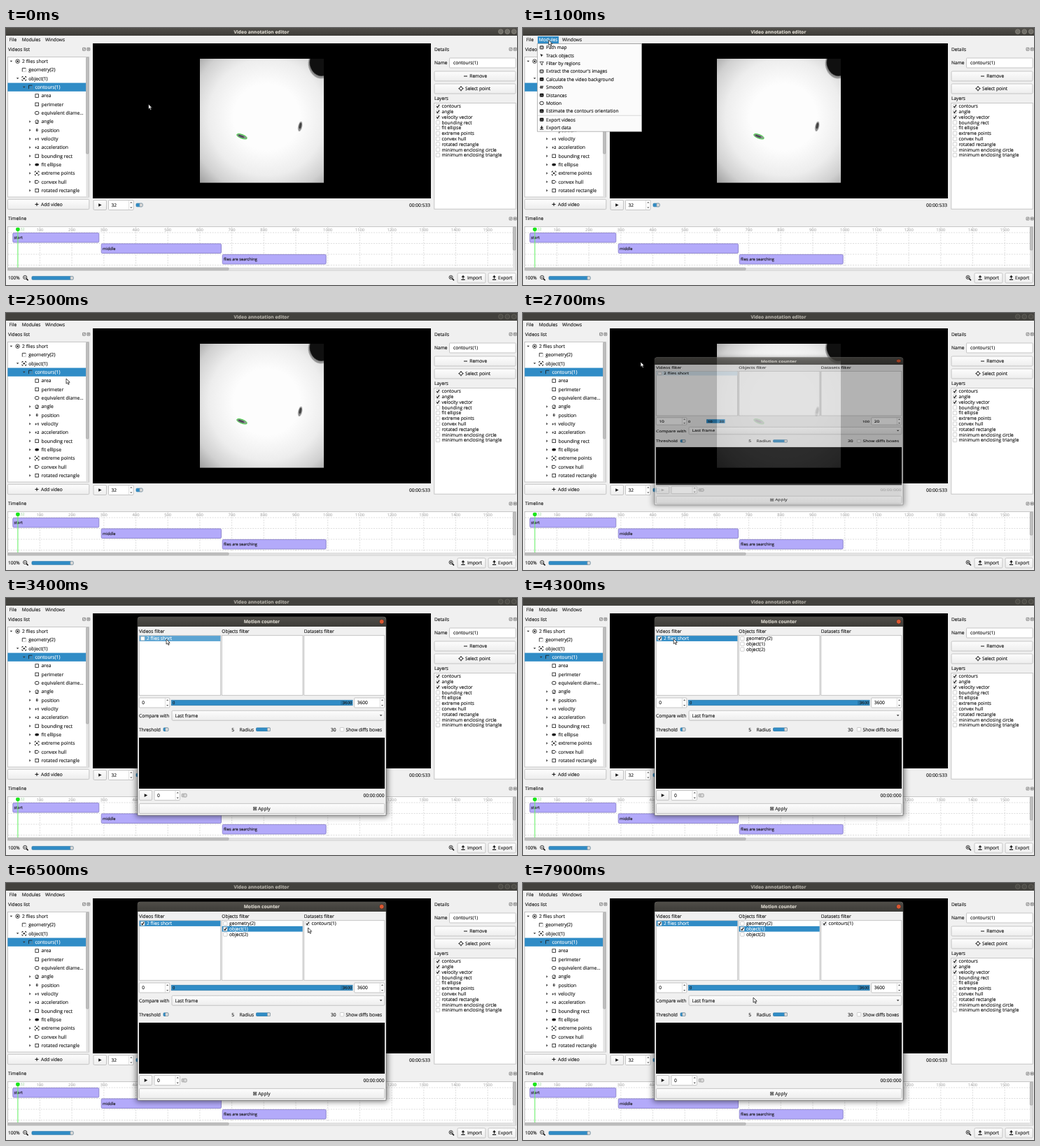
Write an HTML page that moves like this. It is 730 px wide and 368 px high and loops after 8000 ms.

```html
<!DOCTYPE html>
<html lang="en">
<head>
<meta charset="utf-8">
<title>Video annotation editor</title>
<style>
  html, body { margin: 0; width: 100%; height: 100%; overflow: hidden; background: #f0f0f0; }
  svg { display: block; width: 730px; height: 368px; }
  text { font: 6.62px "Open Sans", "Noto Sans", sans-serif; text-rendering: geometricPrecision; white-space: pre; stroke-width: .13; }
</style>
</head>
<body>
<svg viewBox="0 0 730 368">
  <defs>
    <linearGradient id="bar" x2="0" y2="1"><stop stop-color="#504e49"/><stop offset="1" stop-color="#3d3c38"/></linearGradient>
    <linearGradient id="face" x2="0" y2="1"><stop stop-color="#fdfdfd"/><stop offset="1" stop-color="#ededed"/></linearGradient>
    <radialGradient id="dish" cx=".54" cy=".47" r=".76">
      <stop offset=".35" stop-color="#fdfdfd"/><stop offset=".62" stop-color="#ededed"/>
      <stop offset=".82" stop-color="#d0d0d0"/><stop offset="1" stop-color="#9c9c9c"/>
    </radialGradient>
    <filter id="soft" x="-50%" y="-50%" width="200%" height="200%"><feGaussianBlur stdDeviation=".7"/></filter>
    <filter id="shade" x="-10%" y="-10%" width="120%" height="120%"><feGaussianBlur stdDeviation="4"/></filter>
    <clipPath id="frame"><rect x="277" y="44" width="177" height="177.6"/></clipPath>
  </defs>
  <g id="window"></g>
  <g id="overlay"></g>
</svg>
<script>
const LOOP = 8000, STEP = 100;
const BLUE = '#308cc6', INK = '#151515', EDGE = '#b9b9b9';

const rect = (x, y, w, h, fill, stroke = 'none', r = 0) =>
  `<rect x="${x}" y="${y}" width="${w}" height="${h}" rx="${r}" fill="${fill}" stroke="${stroke}" stroke-width=".8"/>`;
const path = (d, stroke = INK, width = .9, fill = 'none') =>
  `<path d="${d}" fill="${fill}" stroke="${stroke}" stroke-width="${width}"/>`;
const disc = (x, y, r, fill, stroke = 'none') =>
  `<circle cx="${x}" cy="${y}" r="${r}" fill="${fill}" stroke="${stroke}" stroke-width=".8"/>`;
// Text is placed by its vertical middle.
const text = (x, y, s, { fill = INK, anchor = 'start', size = 6.62, bold = false } = {}) =>
  `<text x="${x}" y="${y + size * .36}" fill="${fill}" stroke="${fill}" text-anchor="${anchor}" style="font-size:${size}px;font-weight:${bold ? 700 : 400}">${s}</text>`;
const at = (x, y, body) => `<g transform="translate(${x} ${y})">${body}</g>`;

const button = (x, y, w, h) => rect(x, y, w, h, 'url(#face)', EDGE, 1.5);
const field = (x, y, w, h) => rect(x, y, w, h, '#fff', EDGE, 1);
const play = (x, y, fill = INK) => path(`M${x - 1.8} ${y - 2.3}l4.4 2.3l-4.4 2.3z`, 'none', 0, fill);

function spin(x, y, w, value) {
  const a = x + w - 3.2, mid = y + 7;
  return field(x, y, w, 14) + path(`M${x + w - 6.4} ${y}v14`, '#d0d0d0', .7) + text(x + 4, mid, value) +
    path(`M${a - 1.5} ${mid - 3}l1.5 -1.8l1.5 1.8z`, 'none', 0, '#555') +
    path(`M${a - 1.5} ${mid + 3}l1.5 1.8l1.5 -1.8z`, 'none', 0, '#555');
}
const slider = (x, y, w, blue = true) =>
  rect(x, y - 2.3, w, 4.6, blue ? BLUE : '#c8c8c8', blue ? '#2a7bad' : '#aaa', 1) +
  rect(x + w - 4, y - 2.3, 4, 4.6, '#dedede', '#a2a2a2', 1);
const check = (x, y, on) => rect(x - 2.7, y - 2.7, 5.4, 5.4, '#fff', '#c4c4c4', .6) +
  (on ? path(`M${x - 1.7} ${y}l1.2 1.7l2.3 -3.6`, '#111', 1.1) : '');
const dockButtons = (x, y) => [x, x + 6.3].map(cx =>
  rect(cx - 2, y - 2, 4, 4, '#e4e4e4', '#777', .5) + path(`M${cx - 1} ${y + 1}l2 -2`, '#555', .7)).join('') +
  path(`M${x + 5.3} ${y - 1}l2 2`, '#555', .7);
const dock = (x, y, label, bx) => text(x, y, label) + dockButtons(bx, y);

const SQUARE = rect(-2.3, -2.3, 4.6, 4.6, 'none', INK);
const CORNERS = path('M-2.8 -1.2v-1.6h1.6M1.2 -2.8h1.6v1.6M2.8 1.2v1.6h-1.6M-1.2 2.8h-1.6v-1.6');
const DOTTED = path('M-2.5 2.5v-5h5', INK, .8) + path('M2.5 -2v4.5h-5', '#888', .8).replace('/>', ' stroke-dasharray="1 .8"/>');
const word = s => text(0, 0, s, { anchor: 'middle', size: 5.2, bold: true });
const ICONS = {
  video: disc(0, 0, 2.8, 'none', INK) + disc(0, 0, 1.2, INK),
  outline: DOTTED,
  object: CORNERS + disc(0, 0, 1.2, INK),
  square: SQUARE,
  ring: `<ellipse rx="2.8" ry="2.3" fill="none" stroke="${INK}" stroke-width=".9"/>`,
  dial: disc(0, 0, 2.3, 'none', INK) + path('M0 0l2 -1.6M-2 2.6h4', INK, 1),
  zero: word('0'), one: word('+1'), two: word('+2'),
  oval: `<ellipse rx="2.8" ry="1.9" fill="${INK}"/>`,
  hull: path('M-2.6 -2h3.6l1.8 2l-1.8 2h-3.6z'),
  map: rect(-2.4, -2.1, 4.8, 4.2, '#999', INK, .5) + path('M-1.6 1.3l1.6 -2l1.6 2', '#eee', .7),
  dark: rect(-2.4, -2.1, 4.8, 4.2, INK, INK, .5) + path('M-1.6 1.3l1.6 -1.6l1.6 1.6', '#ccc', .6),
  arrow: path('M-2 -2.4l4.4 2.2l-2 .5l-.8 2z', 'none', 0, INK),
  funnel: path('M-2.6 -2.2h5.2l-1.9 2.4v2.2l-1.4 -.8v-1.4z', INK, .7),
  wave: path('M-2.5 1l1.3 -3v4l1.8 -4v4l1.8 -4', INK, .8),
  save: path('M-2.6 2.4h5.2M0 1v-3.6M-1.8 -.8l1.8 2l1.8 -2', INK, 1.1)
};
const TREE = [
  [0, 'video', '2 flies short', 'v'], [1, 'outline', 'geometry(2)'], [1, 'object', 'object(1)', 'v'],
  [2, 'outline', 'contours(1)', 'v'], [3, 'square', 'area'], [3, 'square', 'perimeter'],
  [3, 'ring', 'equivalent diame…'], [3, 'dial', 'angle', '>'], [3, 'zero', 'position', '>'],
  [3, 'one', 'velocity', '>'], [3, 'two', 'acceleration', '>'], [3, 'square', 'bounding rect', '>'],
  [3, 'oval', 'fit ellipse', '>'], [3, 'object', 'extreme points', '>'],
  [3, 'hull', 'convex hull', '>'], [3, 'square', 'rotated rectangle', '>']
];
const LAYERS = ['contours', 'angle', 'velocity vector', 'bounding rect', 'fit ellipse', 'extreme points',
  'convex hull', 'rotated rectangle', 'minimum enclosing circle', 'minimum enclosing triangle'];
const MENU = [['map', 'Path map'], ['arrow', 'Track objects'], ['funnel', 'Filter by regions'],
  ['map', "Extract the contour's images"], ['dark', 'Calculate the video background'], ['wave', 'Smooth'],
  ['dark', 'Distances'], ['ring', 'Motion'], ['dark', 'Estimate the contours orientation'],
  ['dark', 'Export videos'], ['save', 'Export data']];

function tree() {
  const rows = TREE.map(([level, icon, label, arrow], i) => {
    const y = 47.7 + i * 12.33, x = level * 9.2, chosen = i === 3;
    const mark = arrow === 'v' ? path(`M${x + 5.6} ${y - 1}l1.8 2l1.8 -2z`, 'none', 0, '#333')
      : arrow ? path(`M${x + 5.8} ${y - 1.8}l2 1.8l-2 1.8z`, 'none', 0, '#333') : '';
    return (chosen ? rect(2.4, y - 6.1, 113, 12.2, BLUE) : '') + mark + at(x + 16.6, y, ICONS[icon]) +
      text(x + 23, y, label, { fill: chosen ? '#fff' : INK, size: 6.8 });
  }).join('');
  return rect(2.4, 41.4, 116, 200.6, '#fff', EDGE) + rows +
    rect(114.4, 41.8, 3.8, 199.8, '#e2e2e2') + rect(114.6, 42, 3.4, 138, '#c0c0c0', '#aaa', 1);
}

function video() {
  return rect(124, 22, 483, 222, '#000') + rect(277, 44, 177, 177.6, 'url(#dish)') +
    `<g clip-path="url(#frame)"><g transform="translate(447.5 54) rotate(-24)" filter="url(#soft)"><ellipse rx="15" ry="19" fill="#909090"/><ellipse cx="1.5" cy="-1.5" rx="14" ry="17.5" fill="#101010"/></g>
    <g transform="translate(337 155.3) rotate(20)"><ellipse rx="7.6" ry="2.6" fill="#8c9690" stroke="#45d045" stroke-width="1.1"/><ellipse cx="-1" rx="4.6" ry="1.3" fill="#4d4858"/></g>
    <g transform="translate(420.2 141) rotate(12)" filter="url(#soft)"><ellipse rx="2.7" ry="7.2" fill="#8e8e8e"/><ellipse cy="-1" rx="1.7" ry="4.3" fill="#3f3f3f"/></g></g>` +
    button(125, 246.5, 18.5, 14) + play(134, 253.5) + spin(146.5, 246.5, 35.5, '32') + slider(186, 253.5, 9) +
    text(606, 253.5, '00:00:533', { anchor: 'end' });
}

function details() {
  return dock(612, 30.3, 'Details', 721) + text(612, 50, 'Name') + field(633.5, 43, 94.7, 14) + text(639, 49.8, 'contours(1)') +
    button(612, 62, 116, 14) + path('M654 69h5', INK, 1) + text(662.3, 69, 'Remove') +
    button(612, 80, 116, 14) + disc(650, 86.7, 2.3, 'none', INK) + path('M650 83v2M650 88.4v2M646.3 86.7h2M651.7 86.7h2') +
    text(656, 86.7, 'Select point') + text(612, 101, 'Layers') + rect(611.8, 107.4, 116.4, 151.8, '#fff', EDGE) +
    LAYERS.map((s, i) => check(617, 112 + i * 7.77, i < 3) + text(622.5, 112 + i * 7.77, s)).join('');
}

function timeline() {
  let grid = '';
  for (let i = 0; i <= 15; i++) {
    const x = 2.7 + i * 45.7;
    grid += path(`M${x} 285v57`, '#cfcfcf', .7) + (i ? text(x, 289.3, i * 100, { fill: '#aaa', anchor: 'middle', size: 5.8 }) : '');
  }
  for (let i = 0; i < 4; i++) grid += path(`M3 ${293 + i * 15.5}h721`, '#cfcfcf', .7);
  const bars = [[9.8, 123, 'start'], [136.2, 171.3, 'middle'], [309.2, 148, 'flies are searching']].map(([x, w, s], i) =>
    rect(x, 293.4 + i * 15.5, w, 13.6, '#b3aafa', '#8279c4', 1.5) + text(x + 1.8, 300.4 + i * 15.5, s, { size: 5.7 })).join('');
  return dock(3, 273, 'Timeline', 721) + rect(2.4, 284.4, 726, 62.6, '#fff', EDGE) +
    `<g stroke-dasharray="2 1.6">${grid}</g>` + bars +
    text(20.5, 288.5, '32', { fill: '#b0ddb0', size: 5.4 }) + path('M16.9 288v55', '#6cf06c', 1.1) +
    rect(14.1, 285.7, 5.6, 5.2, '#19e619', 'none', 1.8) +
    rect(724.2, 284.8, 4, 61.8, '#e2e2e2') + rect(724.4, 285, 3.6, 33, '#c0c0c0', '#aaa', 1) +
    rect(2.8, 343, 721, 3.8, '#e2e2e2') + rect(3, 343.4, 315, 3.2, '#c0c0c0', '#aaa', 1);
}

const lens = (x, y, d) => disc(x - .8, y - .8, 2.6, 'none', INK) + path(`M${x + 1.1} ${y + 1.1}l2.5 2.5`, INK, 1.5) + path(d, INK, .8);
const upload = x => path(`M${x - 2.6} 360.4h5.2M${x} 359v-4M${x - 1.8} 356.8l1.8 -2l1.8 2`, INK, 1.1);
function footer() {
  return text(3, 358, '100%') + lens(28, 357.8, 'M25.8 357h2.8') + slider(37, 358, 59) +
    lens(636.4, 357.8, 'M634.2 357h2.8M635.6 355.6v2.8') +
    button(645, 351, 40, 14) + upload(653) + text(659, 358, 'Import') +
    button(689, 351, 39.3, 14) + upload(697.5) + text(703, 358, 'Export');
}

document.getElementById('window').innerHTML = rect(0, 11, 730, 357, '#f0f0f0') +
  [['File', 4.7], ['Modules', 22.7], ['Windows', 56]].map(([s, x]) => text(x, 16.7, s)).join('') +
  dock(3, 30.3, 'Videos list', 111.5) + tree() + button(2.4, 245.3, 116.4, 14.4) +
  path('M41.5 252.5h5M44 250v5', INK, 1) + text(50, 252.5, 'Add video') +
  video() + details() + timeline() + footer();

function titleBar(active) {
  return rect(0, 0, 730, 11, active ? 'url(#bar)' : '#42413d') +
    text(365, 5.3, 'Video annotation editor', { fill: active ? '#dfdbd2' : '#b5b2aa', anchor: 'middle', bold: true }) +
    [706.8, 716.3, 725.7].map(x => disc(x, 5.2, 3.3, active ? '#6f6d66' : '#4b4a45', active ? '#8d8a82' : '#68665f')).join('');
}

function menu(y) {
  const top = i => 22.2 + i * 11.38 + (i > 8 ? .9 : 0);
  const rows = MENU.map(([icon, s], i) => {
    const hit = y >= top(i) && y < top(i) + 11.38, mid = top(i) + 5.7;
    return (hit ? rect(21, top(i) - .4, 148.2, 11.4, BLUE) : '') + at(26.7, mid, ICONS[icon]) +
      text(33, mid, s, { fill: hit ? '#fff' : INK });
  }).join('');
  return rect(21, 12, 30, 10.5, BLUE) + text(22.7, 16.7, 'Modules', { fill: '#fff' }) +
    rect(20.6, 22.4, 148.8, 125.8, '#fbfbfb', '#a5a5a5') + path('M21 125.3h148', '#ccc', .7) + rows;
}

const dialogShadow = rect(186, 28, 359, 285, '#0008').replace('/>', ' filter="url(#shade)"/>');

function dialog(t) {
  const fresh = t < 2900, picked = t >= 3800, objects = t >= 4000, marked = t >= 5300;
  const list = (x, w) => rect(x, 53.7, w, 85.6, '#fff', EDGE);
  const row = (x, w, i, s, on, fill) => {
    const y = 58 + i * 7.75;
    return (fill ? rect(x + .3, y - 3.9, w - .6, 7.8, fill) : '') + check(x + 5, y, on) + text(x + 10.8, y, s, { fill: fill && !fresh ? '#fff' : INK });
  };
  const hover = fresh ? '#dcebf5' : picked ? BLUE : t >= 3200 ? '#5ba4d2' : '';
  const dim = fresh ? '#aaa' : INK;
  const small = (x, s, anchor = 'start') => text(x, 150, s, { size: 5.8, anchor });
  return path('M188 311.3V31q0 -4 4 -4H539q4 0 4 4V311.3z', '#555', .6, '#f0f0f0') +
    path('M188 41V31q0 -4 4 -4H539q4 0 4 4V41z', 'none', 0, 'url(#bar)') +
    text(365.3, 34, 'Motion counter', { fill: '#dfdbd2', anchor: 'middle', bold: true }) + disc(536.7, 33.8, 3.4, '#dc5630', '#34332f') +
    text(190, 47.2, 'Videos filter') + text(308.3, 47.2, 'Objects filter') + text(425.7, 47.2, 'Datasets filter') +
    list(190.3, 116.4) + list(308.3, 115.7) + list(425.8, 115) + row(190.3, 116.4, 0, '2 flies short', picked, hover) +
    (objects ? ['geometry(2)', 'object(1)', 'object(2)'].map((s, i) =>
      row(308.3, 115.7, i, s, i === 1 && marked, i === 1 && t >= 5000 ? BLUE : '')).join('') : '') +
    (t >= 5500 ? row(425.8, 115, 0, 'contours(1)', t >= 6400, '') : '') +
    spin(190.3, 143, 43.5, fresh ? '10' : '0') + spin(497.7, 143, 43, fresh ? '20' : '3600') +
    (fresh ? small(236, '0') + rect(262, 146.3, 26.5, 7.4, BLUE) + small(264, '10') + small(287, '20', 'end') + small(495, '100', 'end')
      : rect(236.3, 146.3, 258.7, 7.4, BLUE, '#2a7bad') + small(238, '0') + rect(478, 147, 4, 6, '#2878ab') + small(494.3, '3600', 'end')) +
    text(190, 168.6, 'Compare with') + button(237, 161.3, 303.8, 14) + text(241.5, 168.2, 'Last frame') +
    path('M533.7 167.3l1.9 2l1.9 -2z', 'none', 0, '#333') +
    text(190, 188.4, 'Threshold') + slider(225, 188.2, 6.8) + text(326, 188.4, '5', { anchor: 'end' }) +
    text(333.5, 188.4, 'Radius') + slider(357.5, 188.2, 20) + text(471.5, 188.4, '30', { anchor: 'end' }) +
    check(480, 188.2, false) + text(485.6, 188.4, 'Show diffs boxes') + rect(190, 200, 351, 73, '#000') +
    button(190.4, 275.6, 18.2, 14) + play(199.5, 282.6, dim) + spin(212, 275.6, 36.4, fresh ? '' : '0') + slider(251, 282.6, 7, false) +
    text(540.5, 282.8, '00:00:000', { fill: dim, anchor: 'end' }) +
    button(190.4, 294.4, 350.4, 14.2) + rect(353.4, 299.4, 4.4, 4.4, '#bbb', '#555') + rect(354.7, 300.7, 1.8, 1.8, INK) + text(360.2, 301.5, 'Apply');
}

// time, x, y of the pointer tip
const POINTER = [
  [0, 203.5, 109], [200, 196, 104], [800, 42, 20], [900, 36, 16], [1200, 37, 18], [1900, 52, 77],
  [2200, 45, 106], [2400, 45, 106], [2700, 168, 70], [3100, 224, 60], [3400, 229, 59], [3700, 196, 57],
  [4200, 196, 57], [4800, 311, 65], [5200, 313, 64], [6000, 318, 61], [6200, 440, 58], [6300, 440, 58],
  [6400, 432, 59], [6500, 431.5, 64], [7200, 362, 142], [7600, 331, 163], [7800, 331, 163], [7900, 329, 164]
];
function pointerAt(t) {
  const i = POINTER.findIndex(p => p[0] > t);
  if (i < 0) return POINTER.at(-1).slice(1);
  const [t0, x0, y0] = POINTER[i - 1], [t1, x1, y1] = POINTER[i], k = (t - t0) / (t1 - t0);
  return [x0 + (x1 - x0) * k, y0 + (y1 - y0) * k];
}

function overlay(t) {
  const [x, y] = pointerAt(t);
  let out = titleBar(t < 2500);
  if (t >= 1000 && t < 2400) out += menu(y);
  if (t >= 2600) {
    const [grow, alpha] = { 2600: [.45, .32], 2700: [.743, .7], 2800: [.94, .93] }[t] || [1, 1];
    out += `<g transform="translate(0 169.3) scale(1 ${grow}) translate(0 -169.3)">
      <g opacity="${alpha}">${dialogShadow}</g><g opacity="${alpha}">${dialog(t)}</g></g>`;
  }
  return out + at(x, y, path('M0 0V7.2L1.7 5.7L2.9 8.4L4.2 7.8L3 5.2H5.2Z', '#111', .75, '#fff'));
}

const layer = document.getElementById('overlay'), start = performance.now();
let shown = -1;
function tick() {
  const t = Math.floor(((performance.now() - start) % LOOP) / STEP) * STEP;
  if (t !== shown) layer.innerHTML = overlay(shown = t);
  requestAnimationFrame(tick);
}
tick();
</script>
</body>
</html>
```
